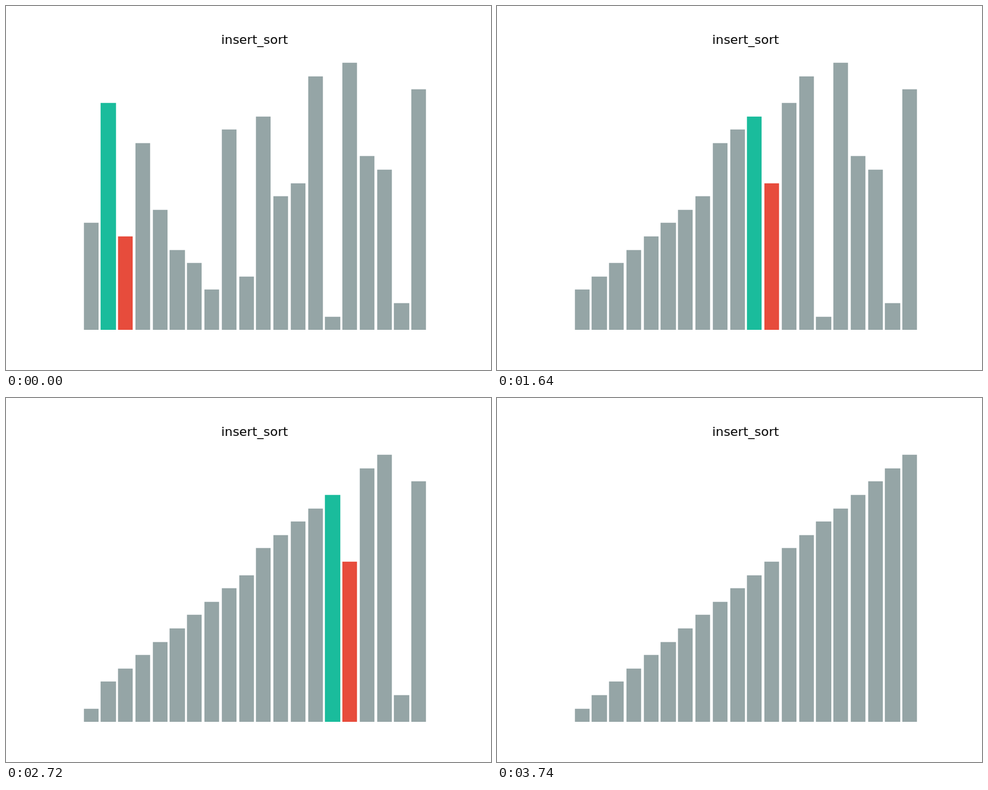
An HTML page with a canvas that plays this animation: 640x480 px, repeating every 3760 ms.

```html
<!DOCTYPE html>
<html lang="en">
<head>
<meta charset="utf-8">
<title>Insertion sort</title>
<style>
  html, body { margin: 0; width: 100%; height: 100%; overflow: hidden; background: #fff; }
  canvas { display: block; }
</style>
</head>
<body>
<canvas id="stage" width="640" height="480"></canvas>
<script>
const ctx = document.getElementById('stage').getContext('2d');

const STEP_MS = 20;
const START = [8, 17, 7, 14, 9, 6, 5, 3, 15, 4, 16, 10, 11, 19, 1, 20, 13, 12, 2, 18];
const GREY = '#95a5a6', GREEN = '#1abc9c', RED = '#e74c3c';

// Plot area in pixels, and pixels per data unit
const LEFT = 80, WIDTH = 496, BASE = 427.2, UNIT_Y = 17.6;
const UNIT_X = WIDTH / 21.78;
const EDGE = 100 / 72;

// One step per comparison, plus one after each swap
function recordSteps(start) {
  const values = [...start];
  const steps = [];
  const record = right => steps.push({ values: [...values], right });

  for (let i = 2; i < values.length; i++) {
    for (let j = i; j > 0; j--) {
      record(j);
      if (values[j - 1] <= values[j]) break;
      [values[j - 1], values[j]] = [values[j], values[j - 1]];
      record(j);
    }
  }
  record(-1);
  return steps;
}

const steps = recordSteps(START);
const snap = v => Math.floor(v + 0.5) + 0.5;

function barColor(index, right) {
  if (right < 0) return GREY;
  if (index === right) return RED;
  return index === right - 1 ? GREEN : GREY;
}

function drawBar(value, index, color) {
  const x = LEFT + (index + 0.99) * UNIT_X;
  const x0 = snap(x), x1 = snap(x + 0.8 * UNIT_X);
  const y0 = snap(BASE - value * UNIT_Y), y1 = snap(BASE);
  ctx.fillStyle = ctx.strokeStyle = color;
  ctx.fillRect(x0, y0, x1 - x0, y1 - y0);
  ctx.strokeRect(x0, y0, x1 - x0, y1 - y0);
}

function drawStep({ values, right }) {
  ctx.fillStyle = '#fff';
  ctx.fillRect(0, 0, 640, 480);

  ctx.fillStyle = '#000';
  ctx.font = `${12 * EDGE}px "DejaVu Sans", sans-serif`;
  ctx.textAlign = 'center';
  ctx.fillText('insert_sort', LEFT + WIDTH / 2, 50);

  ctx.save();
  ctx.beginPath();
  ctx.rect(LEFT, 0, WIDTH, Math.floor(BASE));
  ctx.clip();
  ctx.lineWidth = EDGE;
  values.forEach((value, i) => drawBar(value, i, barColor(i, right)));
  ctx.restore();
}

const startTime = performance.now();

function tick() {
  const elapsed = performance.now() - startTime;
  drawStep(steps[Math.floor(elapsed / STEP_MS) % steps.length]);
  requestAnimationFrame(tick);
}
tick();
</script>
</body>
</html>
```
